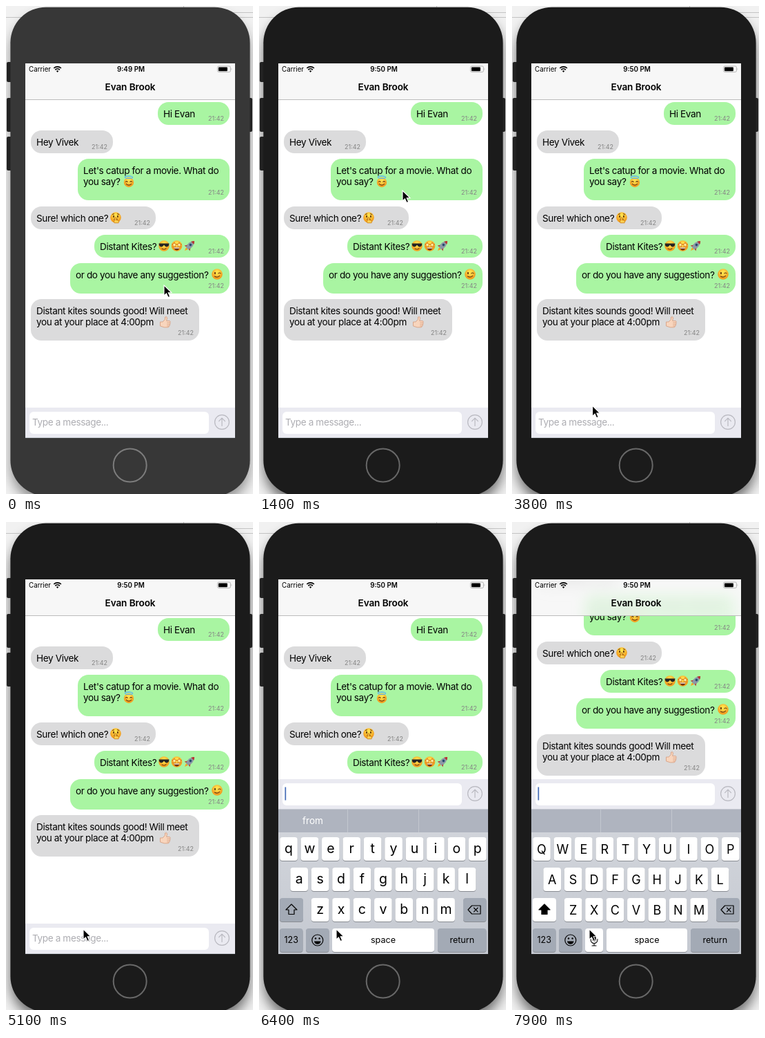
These frames come from a looping animation (358 px wide and 706 px high, 8000 ms). An HTML page:

```html
<!DOCTYPE html>
<html lang="en">
<head>
<meta charset="utf-8">
<title>Chat</title>
<style>
html, body { margin: 0; width: 100%; height: 100%; overflow: hidden; background: #f1f1f1; }
svg { display: block; width: 100vw; height: 100vh; font-family: Inter, Roboto, sans-serif; }
.t { font-size: 13.6px; letter-spacing: -.39px; }
.time { font-size: 9px; fill: #858585; text-anchor: end; }
.mid { text-anchor: middle; }
.line { fill: none; stroke-linecap: round; stroke-linejoin: round; }
</style>
</head>
<body>
<svg viewBox="0 0 358 706">
  <defs>
    <radialGradient id="yellow" cy=".35"><stop offset=".3" stop-color="#ffdf4b"/><stop offset="1" stop-color="#f3a021"/></radialGradient>
    <linearGradient id="keysBg" x2="0" y2="1"><stop stop-color="#d3d6dc"/><stop offset="1" stop-color="#c5c9d1"/></linearGradient>
    <filter id="shadow" x="-20%" y="-10%" width="140%" height="120%"><feGaussianBlur stdDeviation="9"/></filter>
    <filter id="blur" x="-20%" y="-20%" width="140%" height="140%"><feGaussianBlur stdDeviation="9"/></filter>
    <clipPath id="screen"><rect x="28" y="83" width="304" height="542"/></clipPath>
    <clipPath id="top"><rect x="28" y="83" width="304" height="52"/></clipPath>
  </defs>

  <rect width="358" height="706" fill="#f1f1f1"/>
  <path d="M0 16.5H358M257.5 0V3M257 9.5H358" stroke="#c4c4c4"/>
  <rect id="shade" x="7" y="14" width="346" height="706" rx="52" filter="url(#shadow)"/>
  <g fill="#222">
    <rect x="1" y="81" width="9" height="29" rx="2"/>
    <rect x="1" y="133" width="9" height="49" rx="2"/>
    <rect x="1" y="189" width="9" height="49" rx="2"/>
    <rect x="349" y="133" width="8" height="49" rx="2"/>
  </g>
  <rect id="body" x="6.4" y="1.7" width="347.2" height="707" rx="51.5"/>
  <circle id="home" cx="179.7" cy="664.5" r="24" fill="none" stroke-width="2"/>

  <g clip-path="url(#screen)">
    <rect x="28" y="83" width="304" height="542" fill="#fff"/>
    <g id="messages"></g>

    <rect x="28" y="83" width="304" height="52" fill="#f7f7f7"/>
    <g clip-path="url(#top)"><g filter="url(#blur)"><use id="tint" href="#messages"/></g></g>
    <path d="M28 135.5H332" stroke="#bcbcbc"/>
    <text x="33" y="95" font-size="9.8">Carrier</text>
    <g class="line" stroke="#000" stroke-width="1.7" style="stroke-linecap:butt">
      <path d="M69.3 90a7.6 7.6 0 0 1 10.6 0M71.3 92.3a4.7 4.7 0 0 1 6.6 0"/>
    </g>
    <path d="M74.6 96l-1.7-1.9a2.4 2.4 0 0 1 3.4 0z"/>
    <text id="clock" class="mid" x="181" y="95" font-size="9.8" font-weight="600"></text>
    <rect x="306.5" y="87" width="19" height="8.6" rx="2.2" fill="none" stroke="#a8a8a8" stroke-width=".8"/>
    <rect x="307.9" y="88.4" width="13" height="5.8" rx="1"/>
    <path d="M326.7 89.8v3q1.4-1.5 0-3" fill="#a8a8a8"/>
    <text class="mid" x="180" y="122" font-size="13.6" font-weight="600" letter-spacing="-.1">Evan Brook</text>

    <g id="dock">
      <rect x="28" y="372" width="304" height="44" fill="#eaeaf1"/>
      <rect x="34" y="378" width="260" height="32" rx="6" fill="#fff"/>
      <text id="hint" class="t" x="38" y="398" fill="#adadb2">Type a message...</text>
      <rect id="caret" x="37.5" y="383.5" width="1.7" height="19" fill="#4069b5"/>
      <g class="line" stroke="#b9b9c0" stroke-width="1.2">
        <circle cx="313" cy="393" r="10.4"/><path d="M313 398.5v-11M308.6 391.6l4.4-4.4 4.4 4.4"/>
      </g>
      <rect x="28" y="415.5" width="304" height="210" fill="url(#keysBg)"/>
      <rect x="28" y="415.5" width="304" height="33.5" fill="#afb4bf"/>
      <path d="M128.5 416V449M231.5 416V449" stroke="#c3c7cf"/>
      <text id="guess" class="mid" x="78" y="436.5" font-size="13.6" fill="#fff">from</text>
      <g id="keys"></g>
    </g>
  </g>

  <circle id="ring" r="19.8" fill="none" stroke="#000" stroke-width="3.2"/>
  <path id="arrow" d="M0 0V15L3.5 11.8 6 17.5 8.6 16.4 6.2 10.8H11Z" stroke="#fff" stroke-width="1.1"/>
</svg>
<script>
const $ = id => document.getElementById(id);
const LOOP = 8000, STEP = 100, GREEN = '#a9f5a2', GREY = '#dbdbdc';
const WAKE = 400, MINUTE = 1100, FOCUS = 5744, CAPS = 6500, SCROLL = 6480;

// Emoji, drawn around 0,0 in a 16 px box
const stroke = (d, color = '#6b3d10', w = 1.1) => `<path class="line" d="${d}" stroke="${color}" stroke-width="${w}"/>`;
const face = inner => `<circle r="7.8" fill="url(#yellow)"/>` + inner;
const eyes = '<path d="M-3.8-3h1.8v3h-1.8zM2-3h1.8v3H2z" fill="#6b3d10"/>';
const star = x => `<path transform="translate(${x} -1.5)" d="M0-3.6L1.1-1.2 3.5-.9 1.6.8 2.2 3.2 0 2-2.2 3.2-1.6.8-3.5-.9-1.1-1.2Z" fill="#fff0a0" stroke="#d8741a" stroke-width=".9"/>`;
const emoji = {
  angel: '<g transform="translate(0 1) scale(.92)">' + face(stroke('M-5-.5q1.6-2 3.2 0M1.8-.5q1.6-2 3.2 0M-4 2.5q4 4 8 0')) +
    '</g><ellipse cy="-6.3" rx="5.6" ry="1.7" fill="none" stroke="#5fb4ea" stroke-width="1.3"/>',
  hush: face(eyes + stroke('M-4.5-4.6l2-.7M2.5-5.3l2 .7M-2.5 2.2h5') +
    '<path d="M-1.2-.2h2V4l3.8.6-.5 3.2h-6L-3 4.6h1.8z" fill="#ffd556" stroke="#c97a14" stroke-width=".8"/>'),
  cool: face('<path d="M-7.5-3.5h15l-.8 3.5q-3 2.8-5.7 0L0-1.6-1 0q-3 2.8-5.7 0z" fill="#242424"/>' + stroke('M-3 4q3.5 2.2 6-.4')),
  dazzled: face(star(-3.5) + star(3.5) + '<path d="M-4 2.5h8q-.8 4-4 4t-4-4" fill="#70310f"/><path d="M-3.6 2.5h7.2v1.2h-7.2z" fill="#fff"/>'),
  rocket: `<g transform="rotate(45)"><path d="M-2 5h4L0 10z" fill="#f6a51f"/>
    <path d="M-2.5 0L-5.5 5 0 3.6 5.5 5 2.5 0z" fill="#b93330"/>
    <path d="M0-10Q6-3 2.4 5h-4.8Q-6-3 0-10" fill="#8c98a6"/>
    <path d="M0-10q2 2 2.7 4h-5.4q.7-2 2.7-4" fill="#b93330"/><circle cy="-2" r="1.8" fill="#24496f"/></g>`,
  wink: face('<path d="M-4-3h1.9v3H-4z" fill="#6b3d10"/>' + stroke('M1.7-1.2q1.7-1.6 3.4 0M-3.6 3q3.8 2.6 7.2-.6')),
  thumb: `<path d="M-7.5 0h3.6L-.6-3.6-.4-7q2.4-1.4 2.9 1.2L1.7-1.4h4.6q1.7 1.4.4 2.8 1 1.6-.5 2.6.5 1.6-.9 2.3 0 1.6-2 1.6h-5L-7.5 6z" fill="#f8d5bd" stroke="#d39a7b" stroke-width=".8"/>`
    + stroke('M2.6 1.3h3.6M2.6 3.8h3.2M2.6 6h2.6', '#d39a7b', .7)
};

// x, y, width, height, lines, emoji as [name, x, y]
const chat = [
  [220, 139, 104, 33, ['Hi Evan']],
  [36, 180, 119, 33, ['Hey Vivek']],
  [104, 221, 220, 60, ["Let's catup for a movie. What do", 'you say?'], ['angel', 178, 254]],
  [36, 290, 181, 33, ['Sure! which one?'], ['hush', 159, 306]],
  [128, 331, 196, 33, ['Distant Kites?'], ['cool', 229, 347], ['dazzled', 247.5, 347], ['rocket', 266, 347]],
  [93, 372, 231, 44, ['or do you have any suggestion?'], ['wink', 306, 388]],
  [36, 424, 244, 60, ['Distant kites sounds good! Will meet', 'you at your place at 4:00pm'], ['thumb', 231, 457]]
];
$('messages').innerHTML = chat.map(([x, y, w, h, lines, ...icons]) =>
  `<rect x="${x}" y="${y}" width="${w}" height="${h}" rx="15.5" fill="${x > 36 ? GREEN : GREY}"/>` +
  lines.map((s, i) => `<text class="t" x="${x + 8}" y="${y + 21.5 + i * 16.3}">${s}</text>`).join('') +
  `<text class="time" x="${x + w - 8}" y="${y + h - (h > 40 ? 8 : 6)}">21:42</text>` +
  icons.map(([n, ex, ey]) => `<g transform="translate(${ex} ${ey})">${emoji[n]}</g>`).join('')
).join('');

const key = (x, y, w, dark) =>
  `<rect x="${x}" y="${y + 1}" width="${w}" height="34" rx="4" fill="#898c92"/>` +
  `<rect x="${x}" y="${y}" width="${w}" height="34" rx="4" fill="${dark ? '#a3aab5' : '#fff'}"/>`;
const label = (s, x, y, size) => `<text class="mid" x="${x}" y="${y}" font-size="${size}">${s}</text>`;

function keyboard(caps) {
  const letters = [['qwertyuiop', 43], ['asdfghjkl', 58.2], ['zxcvbnm', 88.6]].map(([row, x0], r) =>
    [...row].map((c, i) => {
      const x = x0 + i * 30.42, y = 456 + r * 44;
      return key(x - 12.8, y, 25.6) + label(caps ? c.toUpperCase() : c, x, y + (caps ? 23.5 : 22.5), caps ? 18 : 19.5);
    }).join('')).join('');
  const spaceX = caps ? 137 : 106;
  return letters + key(30, 544, 34, !caps) + key(296, 544, 33.5, true) +
    key(30, 588, 33.5, true) + key(68, 588, 33.5, true) + key(spaceX, 588, 254 - spaceX) + key(259, 588, 70.5, true) +
    `<path d="M47 553l8 8h-4v6.5h-8V561h-4z" stroke="#000" stroke-width="1.2" stroke-linejoin="round" fill="${caps ? '#000' : 'none'}"/>` +
    stroke('M303 561l5.5-6h12.5v12h-12.5zM311.5 558.2l5.6 5.6M317.1 558.2l-5.6 5.6', '#000', 1.2) +
    label('123', 46.7, 609.3, 12.6) + label('space', (spaceX + 254) / 2, 609, 12.6) + label('return', 294.3, 609, 12.6) +
    stroke('M92.8 605a8 8 0 1 1-16 0a8 8 0 1 1 16 0', '#000', 1.2) +
    '<path d="M80 606.5h9.6q-.8 4.3-4.8 4.3t-4.8-4.3"/><circle cx="82" cy="602.5" r="1.2"/><circle cx="87.6" cy="602.5" r="1.2"/>' +
    (caps ? key(106, 588, 26) + '<rect x="116.3" y="597" width="5.4" height="10" rx="2.7"/>' +
      stroke('M114 603.5q0 6 5 6t5-6M119 609.5v3.5M116 613h6', '#000', 1.1) : '');
}
const layouts = [keyboard(false), keyboard(true)];
let shown;

const clamp = v => Math.max(0, Math.min(1, v));
const ease = v => v * v * (3 - 2 * v);
const path = [[300, 229, 404], [1200, 208, 267], [1750, 208, 267], [2600, 210, 360], [3000, 210, 360], [3920, 112, 589]];
function pointer(t) {
  let [, x, y] = path[0];
  for (let i = 1; i < path.length; i++) {
    const [t0, x0, y0] = path[i - 1], [t1, x1, y1] = path[i];
    if (t < t0) break;
    const p = ease(clamp((t - t0) / (t1 - t0)));
    x = x0 + (x1 - x0) * p;
    y = y0 + (y1 - y0) * p;
  }
  return [x, y];
}
const show = (id, on) => $(id).style.display = on ? '' : 'none';
const move = (id, x, y) => $(id).setAttribute('transform', `translate(${x} ${y})`);

function draw(now) {
  const t = Math.floor(now % LOOP / STEP) * STEP;
  const awake = t >= WAKE, focused = t >= FOCUS, caps = +(t >= CAPS);
  $('body').setAttribute('fill', awake ? '#1b1b1b' : '#373737');
  $('shade').setAttribute('opacity', awake ? .55 : .4);
  $('home').setAttribute('stroke', awake ? '#686868' : '#7c7c7c');
  $('clock').textContent = t >= MINUTE ? '9:50 PM' : '9:49 PM';

  // Critically damped rise of the input bar and keyboard
  const k = Math.max(0, t - FOCUS) * .01826;
  move('dock', 0, 209 * (1 + k) * Math.exp(-k));
  show('hint', !focused);
  show('caret', focused && (t - 5850 + 1000) % 1000 < 600);
  show('guess', !caps);
  if (shown !== caps) $('keys').innerHTML = layouts[shown = caps];

  const scroll = ease(clamp((t - SCROLL) / 350));
  move('messages', 0, -117 * scroll);
  $('tint').setAttribute('opacity', .22 * scroll);

  const [x, y] = pointer(t);
  move('arrow', x, y);
  move('ring', x + 1, y + 1.6);
  show('ring', t >= 2700 && t < 3000 || t >= 5500 && t < 5700);
  requestAnimationFrame(draw);
}
draw(performance.now());
</script>
</body>
</html>
```
